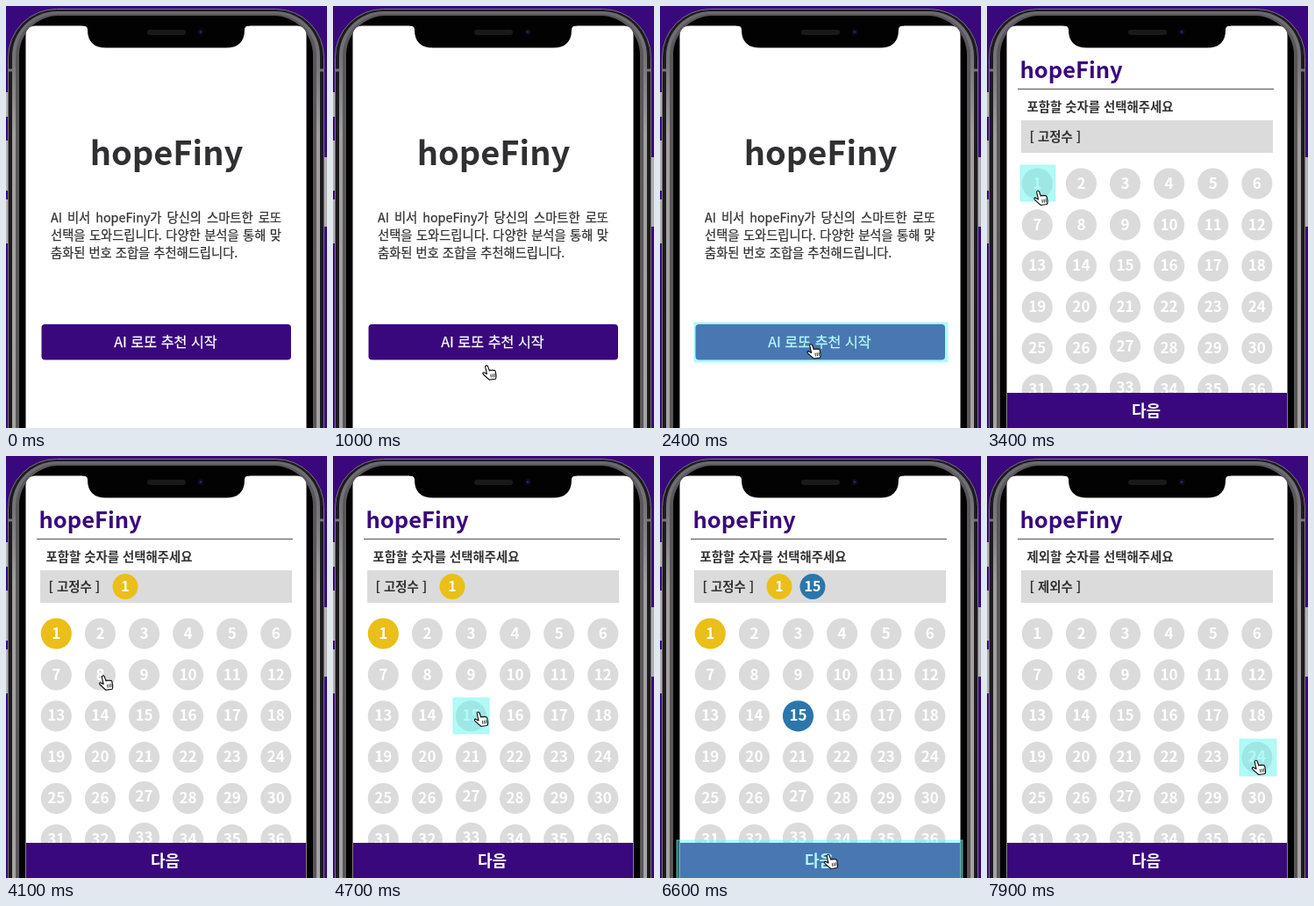
An HTML page that plays this animation: 366 px wide and 480 px high, repeating every 8 s.

```html
<!DOCTYPE html>
<html lang="ko">
<head>
<meta charset="utf-8">
<style>
html, body { margin: 0; width: 100%; height: 100%; overflow: hidden; background: #3a087d }
svg { display: block; width: 366px; height: 480px; font-family: "Noto Sans CJK KR", "Noto Sans KR", sans-serif }
.b { font-weight: 700 }
.mid { text-anchor: middle }
.w { fill: #fff }
.note { font-size: 14.3px; line-height: 20px; color: #333; text-align: justify; white-space: nowrap; -webkit-text-stroke: .25px #333 }
.note div { text-align-last: justify }
.note div:last-child { text-align-last: left }
</style>
</head>
<body>
<svg viewBox="0 0 366 480">
  <defs>
    <linearGradient id="metal" x2="0" y2="1">
      <stop offset="0" stop-color="#6a686e"/><stop offset=".08" stop-color="#77757a"/>
      <stop offset=".2" stop-color="#a29e9d"/><stop offset="1" stop-color="#aaa6a4"/>
    </linearGradient>
  </defs>
  <rect width="366" height="480" fill="#3a087d"/>
  <g fill="#b3b0b2">
    <rect x="-2" y="98" width="5" height="28" rx="1"/>
    <rect x="-2" y="153" width="5" height="57" rx="1"/>
    <rect x="-2" y="220" width="5" height="50" rx="1"/>
    <rect x="362" y="172" width="6" height="79" rx="1"/>
  </g>
  <rect x="2.500" y="3.500" width="360" height="700" rx="55" fill="#1c1b1e" stroke="#77757a"/>
  <rect x="7" y="6" width="351" height="700" rx="51" fill="url(#metal)"/>
  <rect x="11" y="9" width="343" height="700" rx="48" fill="#59575a"/>
  <rect x="15" y="11" width="335" height="700" rx="45" fill="#020202"/>
  <path d="M2 73h5M358 73h5" stroke="#77757a" stroke-width="3"/>
  <rect x="22.500" y="22.500" width="320" height="600" rx="11" fill="#fff"/>
  <path d="M87 21V22.500Q93 22 93 27Q93 47.500 114 47.500H251Q272 47.500 272 27Q272 22 278 22.500V21Z" fill="#020202"/>
  <rect x="161" y="27" width="44" height="6" rx="3" fill="#19191b"/>
  <circle cx="222" cy="29.500" r="3.500" fill="#0b0b1c"/><circle cx="222" cy="29.500" r="1.300" fill="#29297c"/>

  <g id="intro">
    <text class="b mid" x="183" y="180.500" font-size="38" fill="#303033">hopeFiny</text>
    <foreignObject x="51" y="229.500" width="263" height="64">
      <div class="note">
        <div>AI 비서 hopeFiny가 당신의 스마트한 로또</div>
        <div>선택을 도와드립니다. 다양한 분석을 통해 맞</div>
        <div>춤화된 번호 조합을 추천해드립니다.</div>
      </div>
    </foreignObject>
    <rect x="40.500" y="362" width="284.500" height="40.500" rx="4" fill="#3a087d"/>
    <text class="w mid" x="182" y="388.300" font-size="16.200" stroke="#fff" stroke-width=".25">AI 로또 추천 시작</text>
  </g>

  <g id="picker">
    <text class="b" x="37.500" y="81.500" font-size="25.500" fill="#3a087d">hopeFiny</text>
    <path d="M35 94.500H327" stroke="#77757a" stroke-width="1.300"/>
    <g class="b" font-size="14.400" fill="#333">
      <text id="ask" x="45.500" y="119.500"/>
      <rect x="39" y="130" width="287" height="37" fill="#dbdbdb"/>
      <text id="kind" x="48.500" y="154"/>
    </g>
    <g id="balls" class="b mid" font-size="17"></g>
    <rect x="23" y="440" width="319" height="40" fill="#3a087d"/>
    <text class="b w mid" x="181.500" y="466.500" font-size="18">다음</text>
  </g>

  <rect id="glow" fill="#5af5ee" fill-opacity=".47" stroke="#8ffaf4" stroke-opacity=".6"/>
  <g id="hand" fill="#fff" stroke="#111" stroke-width="1.200" stroke-linejoin="round">
    <path d="M-2 1.500Q-.7-.7 1 1L3 6.500Q4 5 5.300 6.200Q6.600 5 7.800 6.200Q9.300 5.300 10 7L11 12Q11.300 14 10.300 16.200L3 17.200Q-1 14-4.500 10.500Q-5.500 8.500-3.500 8.500L0 10.300Z"/>
    <path d="M4.500 10.500l.6 4M6.700 10.200l.6 4M8.800 9.800l.5 4" stroke-width=".9"/>
  </g>
</svg>
<script>
const $ = id => document.getElementById(id);
const GRAY = '#dbdbdb', YELLOW = '#eabf18', BLUE = '#2b76ab';

// start, end, target x, target y; each move eases out
const moves = [
  [40, 2640, 172.5, 384],
  [2700, 3300, 58.5, 210],
  [3900, 4600, 166, 291],
  [5100, 6100, 192, 453],
  [7000, 7700, 307, 346]
];

// start, end, x, y, width, height
const glows = [
  [2100, 2700, 39, 360, 289, 45],
  [3300, 3900, 38, 181, 40, 41],
  [4500, 5100, 137, 275, 41, 41],
  [6300, 7000, 19, 437, 326, 46],
  [7700, 8000, 288, 322, 42, 42]
];

const ball = (id, n, x, y, r, color, size = 17) =>
  `<g id="${id}"><circle cx="${x}" cy="${y}" r="${r}" fill="${color}"/>` +
  `<text class="w" x="${x}" y="${y + size * .33}" font-size="${size}">${n}</text></g>`;

let html = '';
for (let i = 0; i < 36; i++) {
  const lift = i === 26 || i === 32 ? 2 : 0;
  html += ball('n' + (i + 1), i + 1, 57.3 + i % 6 * 50.1, 202 + Math.floor(i / 6) * 46.9 - lift, 17.6, GRAY);
}
html += ball('pick1', 1, 136, 148.5, 14.5, YELLOW, 16) + ball('pick15', 15, 174, 148.5, 14.5, BLUE, 16);
$('balls').innerHTML = html;

const show = (id, on) => $(id).style.display = on ? '' : 'none';
const tint = (n, color) => $('n' + n).firstChild.setAttribute('fill', color);

function handAt(t) {
  let x = 180, y = 446;
  for (const [a, b, tx, ty] of moves) {
    const u = Math.min(1, Math.max(0, (t - a) / (b - a)));
    const k = u * (2 - u);
    x += (tx - x) * k;
    y += (ty - y) * k;
  }
  return `translate(${x} ${y}) scale(.96)`;
}

function draw(t) {
  const exclude = t >= 7000;
  const one = t >= 3900 && !exclude, fifteen = t >= 5100 && !exclude;
  show('intro', t < 2700);
  show('picker', t >= 2700);
  $('ask').textContent = (exclude ? '제외' : '포함') + '할 숫자를 선택해주세요';
  $('kind').textContent = exclude ? '[ 제외수 ]' : '[ 고정수 ]';
  tint(1, one ? YELLOW : GRAY);
  tint(15, fifteen ? BLUE : GRAY);
  show('pick1', one);
  show('pick15', fifteen);

  const glow = glows.find(([a, b]) => t >= a && t < b);
  show('glow', glow);
  if (glow) ['x', 'y', 'width', 'height'].forEach((k, i) => $('glow').setAttribute(k, glow[i + 2]));

  show('hand', t >= 100);
  $('hand').setAttribute('transform', handAt(t));
}

function tick() {
  draw(Math.floor(performance.now() % 8000 / 100) * 100);
  requestAnimationFrame(tick);
}
tick();
</script>
</body>
</html>
```
